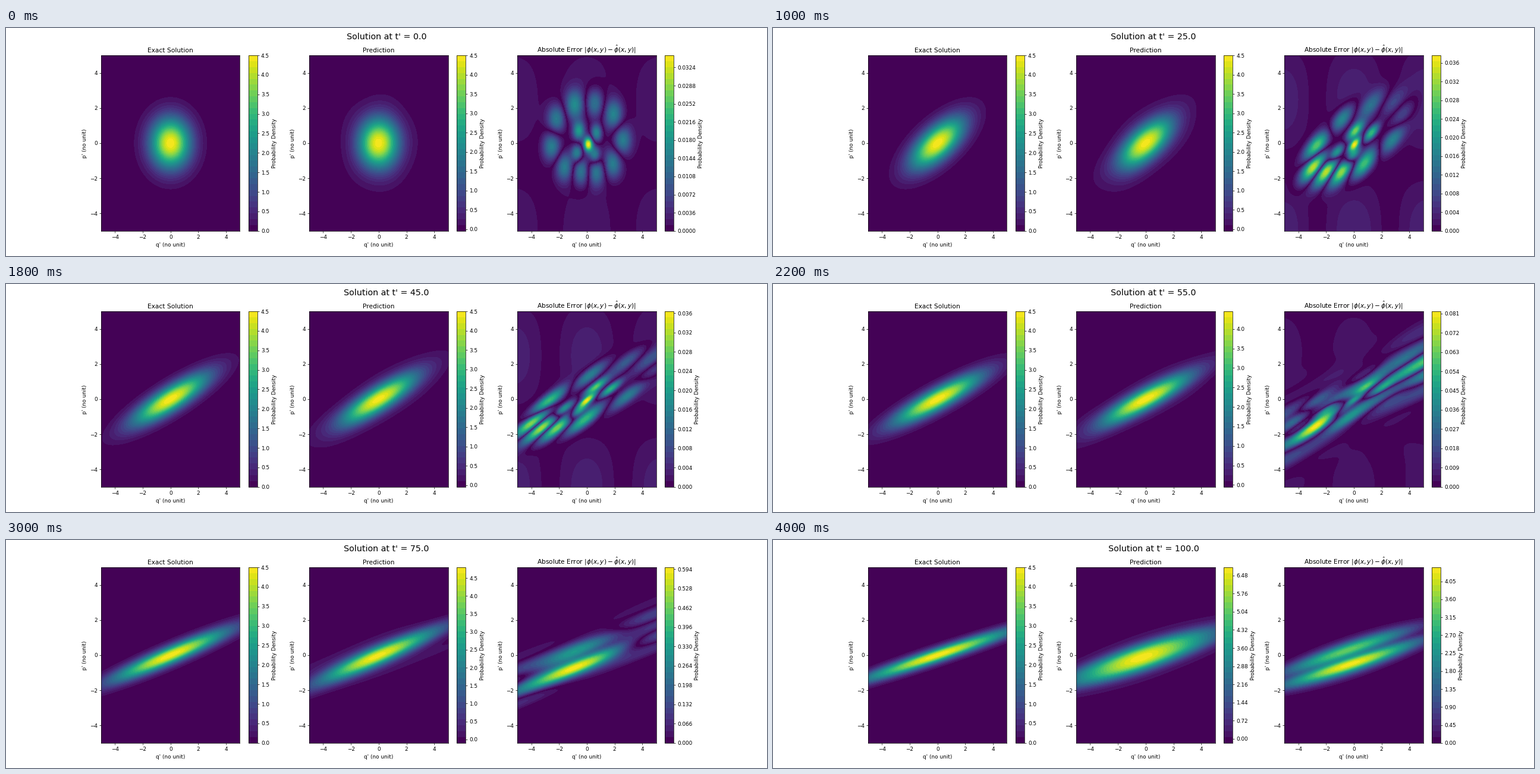
A matplotlib script for the animation above (4200 ms loop, 1280 by 384 pixels).

```python
import numpy as np
import matplotlib.pyplot as plt
from matplotlib.animation import FuncAnimation
from matplotlib.colors import ListedColormap
from matplotlib.ticker import MaxNLocator

N_FRAMES, STEP_MS, DT = 21, 200, 5
PEAK = 4.49         # height of the density
SHEAR = 0.0354      # drift of q per unit of p and time
BANDS = 30          # visible colour steps

shades = np.r_[0.0055, (np.arange(1, BANDS) + 0.5) / BANDS]
CMAP = ListedColormap(plt.get_cmap("viridis")(shades))

axis = np.linspace(-5, 5, 161)
Q, P = np.meshgrid(axis, axis)


def bell(u, v, su=1, sv=1):
    return np.exp(-0.5 * ((u / su) ** 2 + (v / sv) ** 2))


def unit(z):
    return z / np.abs(z).max()


def exact(t):
    return PEAK * bell(Q - SHEAR * t * P, P)


def error_peak(t):
    """Largest error: a dip, a plateau, then near-exponential growth."""
    times = [0, 10, 15, 25, 45, 50, 65, 85, 100]
    peaks = [0.0347, 0.0205, 0.0287, 0.0374, 0.0363, 0.052, 0.2015, 1.775, 4.36]
    return np.exp(np.interp(t, times, np.log(peaks)))


def lobe(t, radius, angle, sq, sp):
    """A spot on a circle, carried and slanted by the shear flow."""
    p = radius * np.sin(angle)
    q = radius * np.cos(angle) + 1.1 * SHEAR * t * p
    dq, dp = Q - q, P - p
    return bell(dq - 0.85 * SHEAR * t * dp, dp, sq, sp)


def early_error(t):
    """Two rings of lobes with alternating sign around a central spot."""
    k = min(t / 15, 1)
    z = (0.4 * k - 1.15) * lobe(t, 0.12, -0.5, 0.22, 0.28)
    for n in range(4):
        angle = np.radians(40 + 90 * n)
        z += 0.6 * (-1) ** n * lobe(t, 0.9, angle, 0.28, 0.36)
    for n in range(10):
        angle = np.radians(4 + 36 * n)
        radius = 2.25 + 0.35 * np.sin(angle) + 0.3 * np.cos(2 * angle)
        amp = 0.52 + 0.35 * k * np.cos(angle - np.radians(250))
        z += amp * (-1) ** n * lobe(t, radius, angle, 0.46, 0.6)
    swell = np.cos(0.6 * Q) * np.cos(0.42 * (P + 5))
    return unit(z + 0.075 * swell)


def late_error(t, ripple):
    """A density that grows too tall and too wide, minus the exact one."""
    def at(*values):
        return np.interp(t, [65, 85, 100], values)

    a = SHEAR * t
    ridge = 0.98 * a / (1 + a * a) * Q + at(-0.03, -0.04, -0.07)
    width = at(0.58, 0.60, 0.736) * (1 - 0.006 * Q ** 2)
    along = np.exp(-(Q + 0.3) ** 2 / at(13, 19, 24))
    across = np.exp(-np.abs((P - ridge) / width) ** at(2, 2, 2.45))
    z = unit(at(4.6, 5.45, 6.75) * along * across - exact(t))
    z -= 0.024 * bell(Q - 3, P + 2.5, 1.2, 0.8)

    # Branches that fan out towards both ends of the ridge
    v = (P - ridge) * np.sqrt(1 + a * a)
    fan = 0.2 * Q * np.cos(np.pi / 2 * (v - 0.6)) * bell(Q, v, 5, 2.4)
    return unit(z + ripple * fan)


def error(t):
    late = np.interp(t, [45, 65], [0, 1])
    ripple = np.interp(t, [65, 85], [1, 0])
    z = np.zeros_like(Q)
    if late < 1:
        z += (1 - late) * early_error(t)
    if late > 0:
        z += late * late_error(t, ripple)
    return error_peak(t) * unit(z)


def scale(z):
    """Range and tick values of about a hundred round levels."""
    lo, hi = z.min(), z.max()
    lev = MaxNLocator(101, min_n_ticks=1).tick_values(lo, hi)
    first = max(np.searchsorted(lev, lo, "right") - 1, 0)
    last = np.searchsorted(lev, hi, "left")
    lev = lev[first:last + 1]
    step = int(np.ceil(len(lev) / 10))
    start = np.abs(lev).argmin() % step
    return lev[0], lev[-1], lev[start::step]


def panel(ax, z, title):
    lo, hi, ticks = scale(z)
    filled = ax.contourf(Q, P, z, levels=np.linspace(lo, hi, BANDS + 1),
                         cmap=CMAP)
    fig.colorbar(filled, ax=ax, ticks=ticks, label="Probability Density")
    ax.set(title=title, xlabel="q' (no unit)", ylabel="p' (no unit)",
           xticks=range(-4, 5, 2), yticks=range(-4, 5, 2))


def draw(i):
    t = i * DT
    fig.clf()
    left, mid, right = fig.subplots(1, 3)
    truth, diff = exact(t), error(t)
    panel(left, truth, "Exact Solution")
    panel(mid, truth + diff, "Prediction")
    panel(right, np.abs(diff),
          r"Absolute Error $|\phi(x, y) - \hat{\phi}(x, y)|$")
    fig.suptitle(f"Solution at t' = {t:.1f}", fontsize=16)
    return []


fig = plt.figure(figsize=(20, 6), dpi=64)
anim = FuncAnimation(fig, draw, frames=N_FRAMES, interval=STEP_MS,
                     init_func=lambda: [], repeat=True, repeat_delay=0)
plt.show()
```
